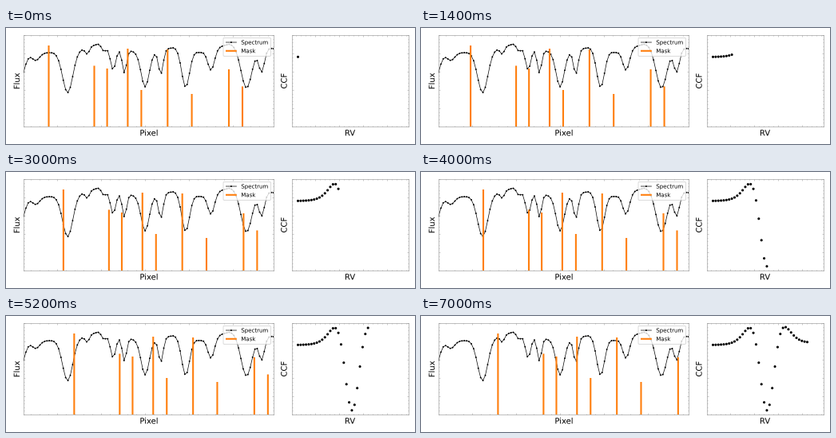
Animation, 512 px wide and 146 px high, one loop 7.2 s. Source, as a matplotlib script:

```python
import numpy as np
import matplotlib.pyplot as plt
from matplotlib.animation import FuncAnimation
from matplotlib.collections import EllipseCollection
from matplotlib.patches import FancyBboxPatch, PathPatch
from matplotlib.textpath import TextPath
from matplotlib.transforms import Affine2D

W, H, DPI = 512, 146, 64
PT = 72 / DPI  # points per pixel
FRAMES, INTERVAL = 36, 200
ORANGE = "tab:orange"
LEFT, RIGHT, TOP, BOTTOM = 22, 335, 9, 124
SHIFT = 1.225  # mask shift per frame

# All lengths are stage pixels, y pointing down.
CONTINUUM = [(22, 34.5), (53, 31), (70, 30.5), (98, 26), (117, 19.5),
             (140, 26), (162, 30), (185, 30), (210, 24.5), (243, 31),
             (280, 20), (335, 26)]
# Absorption lines: centre, depth, width.
DIPS = [(18, 29, 5), (37.5, 8, 4.5), (77.3, 52, 6.4), (101.8, 8, 2.5),
        (122.5, 8, 3), (134, 28, 3.4), (148.2, 29, 2.7), (174.2, 44, 5.1),
        (193.8, 30, 2.9), (224.8, 47, 4.9), (256.8, 26, 4.2),
        (301, 53, 6.9), (320, 30, 3.6)]
# Mask bars: position at the start, top.
BARS = [(53.5, 22), (110.5, 47.5), (126.6, 51), (152.4, 26), (169.4, 78),
        (202.3, 27), (232.6, 83), (279, 52), (296, 73.5)]


def gauss(d, width):
    return np.exp(-d**2 / (2 * width**2))


def spectrum(x):
    y = np.interp(x, *zip(*CONTINUUM))
    return y + sum(depth * gauss(x - c, width) for c, depth, width in DIPS)


def correlation(step):
    """Narrow trough inside a broad hump on a slowly rising base."""
    d = step - 20.1
    return 36.4 - 0.08 * step + 153 * gauss(d, 2.74) - 69 * gauss(d, 5)


fig = plt.figure(figsize=(W / DPI, H / DPI), dpi=DPI, facecolor="white")


def stage_axes(left, right, top, bottom):
    """Axes whose data units are stage pixels."""
    ax = fig.add_axes([left / W, 1 - bottom / H,
                       (right - left) / W, (bottom - top) / H])
    ax.set(xlim=(left, right), ylim=(bottom, top))
    return ax


def panel(left, right, x_first, x_step, y_step=23):
    ax = stage_axes(left, right, TOP, BOTTOM)
    for axis, first, end, step in ((ax.xaxis, x_first, right, x_step),
                                   (ax.yaxis, TOP, BOTTOM, y_step)):
        axis.set_ticks(np.arange(first, end, step))
        axis.set_ticks(np.arange(first - step, end, step / 5), minor=True)
    ax.set(xlim=(left, right), ylim=(BOTTOM, TOP))
    for which, length in (("major", 2.4), ("minor", 1.3)):
        ax.tick_params(which=which, direction="in", length=length * PT,
                       width=0.5 * PT, color="0.6", top=True, right=True,
                       labelbottom=False, labelleft=False)
    for spine in ax.spines.values():
        spine.set(linewidth=0.56 * PT, edgecolor="0.55")
    return ax


def discs(ax, x, y, size):
    x, y = np.atleast_1d(x), np.atleast_1d(y)
    sizes = np.full(len(x), size)
    return ax.add_collection(EllipseCollection(
        sizes, sizes, np.zeros(len(x)), units="dots", facecolors="black",
        linewidths=0, offsets=np.column_stack([x, y]),
        offset_transform=ax.transData, zorder=2), autolim=False)


def write(x, y, text, size, rotation=0, centred=True):
    """Text as outlines, so that letters sit between whole pixels."""
    path = TextPath((0, 0), text, size=size)
    offset = -path.get_extents().x1 / 2 if centred else 0
    place = (Affine2D().translate(offset, 0).rotate_deg(rotation)
             .scale(1, -1).translate(x, y))
    overlay.add_patch(PathPatch(path, facecolor="black", linewidth=0,
                                transform=place + overlay.transData))


flux_ax = panel(LEFT, RIGHT, 63.5, 55)
ccf_ax = panel(357.5, 503.5, 387, 30)
overlay = stage_axes(0, W, 0, H)
overlay.axis("off")

write(178.5, 135.5, "Pixel", 10)
write(430.5, 135.5, "RV", 10)
write(17, 67, "Flux", 10, 90)
write(351.5, 67, "CCF", 10, 90)

pixels = np.linspace(LEFT, RIGHT, 108)
flux_ax.plot(pixels, spectrum(pixels), color="black", lw=0.7 * PT)
discs(flux_ax, pixels, spectrum(pixels), 1.9)
mask = flux_ax.vlines([], [], [], color=ORANGE, lw=2.1 * PT, snap=False)

steps = np.arange(FRAMES)
dots = discs(ccf_ax, 365.5 + 3.372 * steps, correlation(steps), 3.1)

overlay.add_patch(FancyBboxPatch(
    (272, 12.3), 59.5, 23.2, boxstyle="round,pad=0,rounding_size=1.4",
    facecolor=(1, 1, 1, 0.8), edgecolor="0.8", linewidth=0.7 * PT))
for y, text, color, width in ((18, "Spectrum", "black", 0.7),
                              (28.8, "Mask", ORANGE, 2.1)):
    overlay.plot([275, 288.8], [y, y], color=color, lw=width * PT,
                 solid_capstyle="butt", snap=False)
    write(294.3, y + 2.5, text, 7, centred=False)
discs(overlay, 281.9, 18, 1.9)


def draw(i):
    mask.set_segments([[(x + SHIFT * i, BOTTOM), (x + SHIFT * i, top)]
                       for x, top in BARS])
    colors = np.zeros((FRAMES, 4))
    colors[:i + 1, 3] = 1
    dots.set_facecolor(colors)
    return mask, dots


anim = FuncAnimation(fig, draw, frames=FRAMES, init_func=lambda: draw(0),
                     interval=INTERVAL, repeat=True, repeat_delay=0)
plt.show()
```
